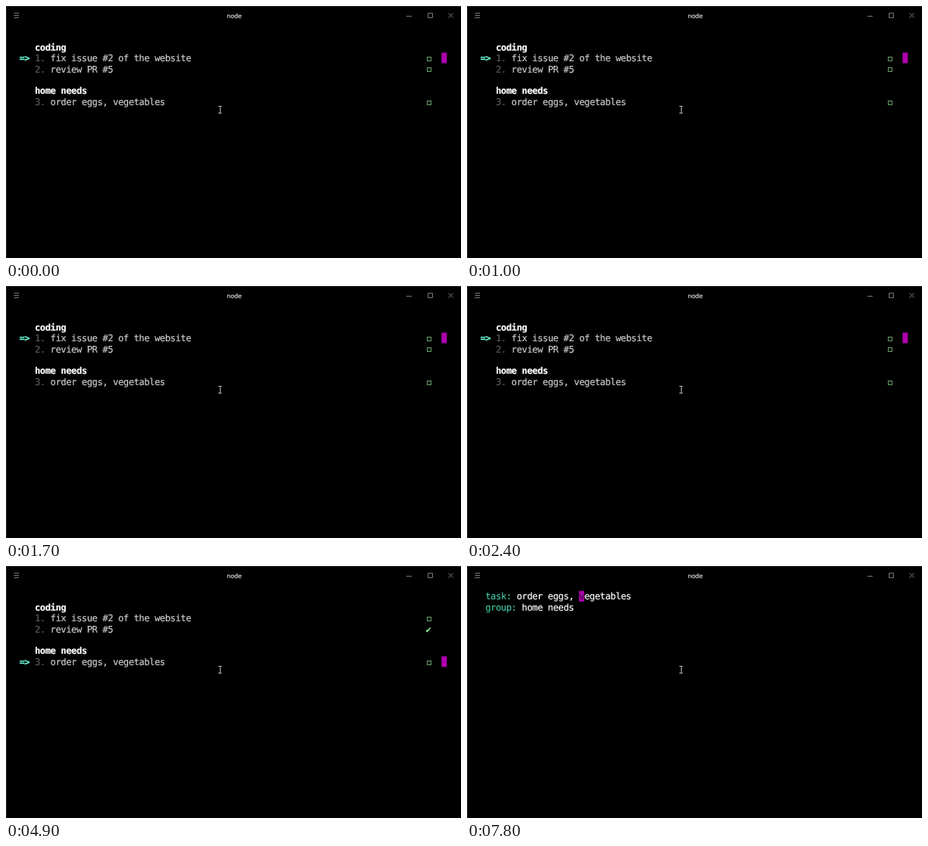
An HTML page that plays this animation: 600x333 px, repeating every 8 s.

```html
<!DOCTYPE html>
<html lang="en">
<head>
<meta charset="utf-8">
<title>node</title>
<style>
  html, body { margin: 0; width: 100%; height: 100%; overflow: hidden; background: #000; }
  svg { display: block; width: 600px; height: 333px; }

  /* tall glyphs on a tight 6.875px grid */
  text {
    font: 12.2px "DejaVu Sans Mono", monospace;
    letter-spacing: -.47px;
    text-rendering: geometricPrecision;
    color: #ccc;
  }
  text, tspan { fill: currentColor; stroke: currentColor; stroke-width: .18px; }
  .title { font: 8px "DejaVu Sans", sans-serif; letter-spacing: -.1px; text-anchor: middle; color: #e4e4e4; }
  .head { font-weight: bold; color: #fff; }
  .num { color: #5c5c5c; }
  .arrow { font-weight: bold; color: #6fffdc; }
  .tick { color: #7fe08a; }
  .edit text { color: #fff; }
  .edit .label { color: #3fbf9f; }
  .edit .under { color: #3a0a3a; }
  .block { fill: #b000b0; }
  .box { fill: none; stroke: #68a068; }
  .chrome { fill: none; stroke: #787878; }
  .frame { fill: none; stroke: #262626; }
  .pointer { fill: none; stroke: #b4b4b4; }

  .list, .edit, .todo, .tick, .select, .caret { animation: 8s step-end infinite; }
  .list { animation-name: leave; }
  .edit { animation-name: enter; }
  .todo { animation-name: uncheck; }
  .tick { animation-name: check; }
  .select { animation-name: select; }
  .caret { animation-name: caret; }

  @keyframes leave { 0% { opacity: 1 } 82.5%, 100% { opacity: 0 } }
  @keyframes enter { 0% { opacity: 0 } 82.5%, 100% { opacity: 1 } }
  @keyframes uncheck { 0% { opacity: 1 } 51.25%, 100% { opacity: 0 } }
  @keyframes check { 0% { opacity: 0 } 51.25%, 100% { opacity: 1 } }

  /* one row is 14.45px */
  @keyframes select {
    0% { transform: none }
    38.75% { transform: translateY(14.45px) }
    61.25%, 100% { transform: translateY(57.8px) }
  }

  /* one column is 6.875px: a single step, then key repeat */
  @keyframes caret {
    0% { transform: none }
    87.5% { transform: translateX(6.875px) }
    93.75% { transform: translateX(20.625px) }
    95% { transform: translateX(41.25px) }
    96.25% { transform: translateX(61.875px) }
    97.5%, 100% { transform: translateX(82.5px) }
  }
</style>
</head>
<body>
<svg viewBox="0 0 600 333">
  <defs>
    <clipPath id="cell"><rect class="caret" x="65.2" y="33" width="6.9" height="14"/></clipPath>
  </defs>
  <rect width="600" height="333"/>

  <path class="frame" d="M.5 333V.5H600"/>
  <path class="chrome" d="M10.5 9.5h6.5M10.5 12.5h6.5M10.5 15.5h6.5M528 13.5h7M556.5 9.5h6v6h-6zM583.5 9.5l6 6M589.5 9.5l-6 6"/>
  <text class="title" x="301" y="15.8">node</text>

  <g class="list">
    <text class="head" x="38" y="58.6">coding</text>
    <text x="38" y="73"><tspan class="num">1.</tspan> fix issue #2 of the website</text>
    <text x="38" y="87.5"><tspan class="num">2.</tspan> review PR #5</text>
    <text class="head" x="38" y="116.3">home needs</text>
    <text x="38" y="130.8"><tspan class="num">3.</tspan> order eggs, vegetables</text>

    <rect class="box" x="555.5" y="67.5" width="5" height="5"/>
    <rect class="box todo" x="555.5" y="81.5" width="5" height="5"/>
    <rect class="box" x="555.5" y="125.5" width="5" height="5"/>
    <text class="tick" x="553.5" y="87.5">✔</text>

    <g class="select">
      <text class="arrow" x="17.4" y="73">=&gt;</text>
      <rect class="block" x="574.4" y="61.6" width="6.9" height="14"/>
    </g>
  </g>

  <g class="edit">
    <text x="24.2" y="44.1"><tspan class="label">task:</tspan> order eggs, vegetables</text>
    <text x="24.2" y="58.5"><tspan class="label">group:</tspan> home needs</text>
    <g clip-path="url(#cell)">
      <rect class="block" x="60" y="30" width="180" height="20"/>
      <text class="under" x="65.45" y="44.1">order eggs, vegetables</text>
    </g>
  </g>

  <path class="pointer" d="M280 132.5h4.5M282.5 132.5v9M280 141.5h4.5"/>
</svg>
</body>
</html>
```
